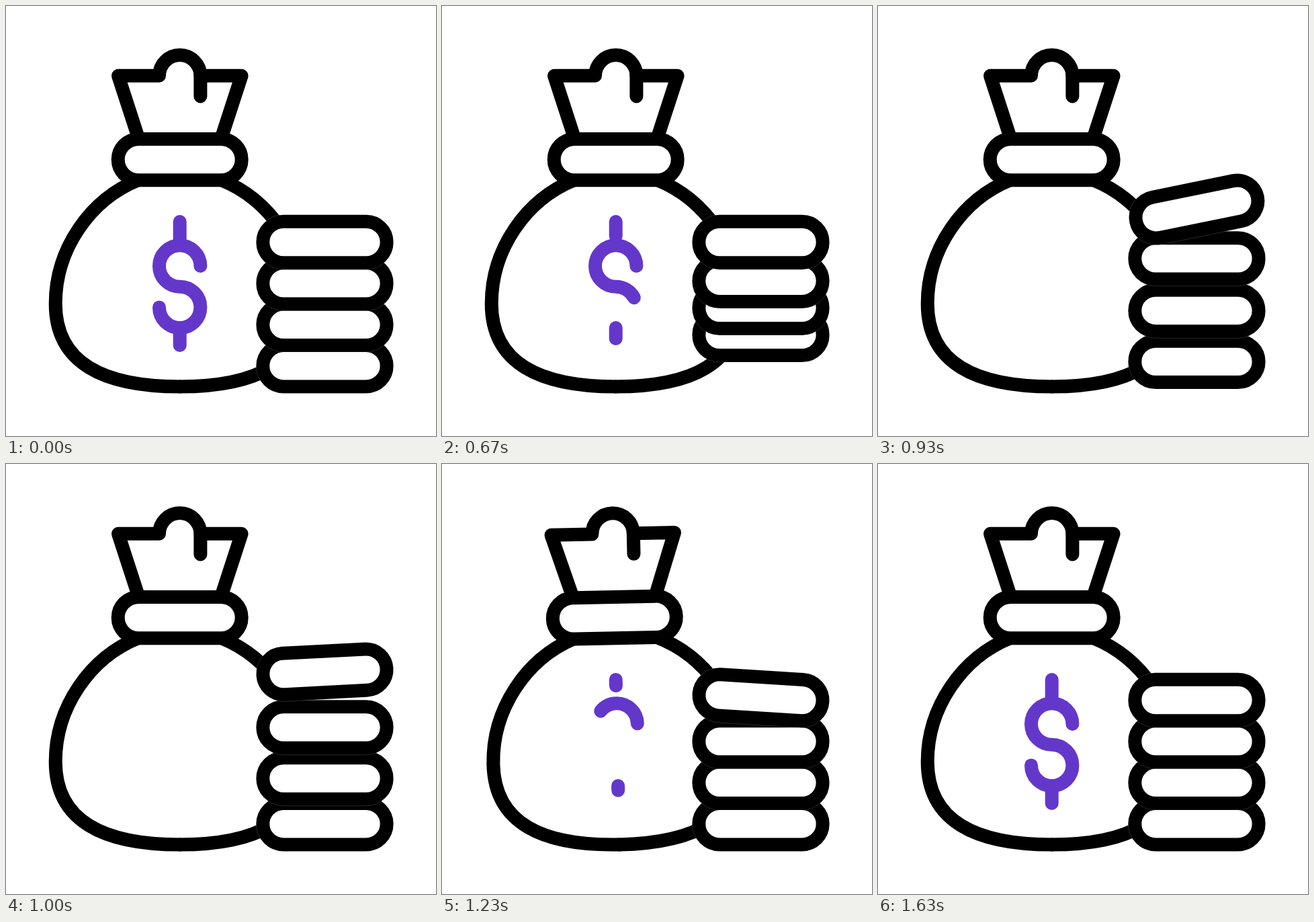
Animation of 640 by 640 pixels, one loop 2.5 s. Source, as an HTML page with a canvas:

```html
<!DOCTYPE html>
<html lang="en">
<head>
<meta charset="utf-8">
<title>Money bag and coins</title>
<style>
  html, body { margin: 0; width: 100%; height: 100%; overflow: hidden; background: #fff; }
  canvas { display: block; width: 100vw; height: 100vh; }
</style>
</head>
<body>
<canvas id="stage" width="640" height="640"></canvas>
<script>
const ctx = document.getElementById('stage').getContext('2d');
const LOOP = 2500, STEP = 100 / 3;
const R = 30.7, CX = 258.7, PIVOT_Y = 320;
const PURPLE = '#6437cb';
const COIN_X = 474.5, COIN_Y = 351.5, COIN_GAP = 61.4, LIFT = 50;

const clamp = v => Math.max(0, Math.min(1, v));
const smooth = u => u * u * (3 - 2 * u);

// Eased value through [time, value] keys
function track(keys, k) {
  if (k <= keys[0][0]) return keys[0][1];
  for (let i = 1; i < keys.length; i++) {
    const [t0, a] = keys[i - 1], [t1, b] = keys[i];
    if (k <= t1) return a + (b - a) * smooth((k - t0) / (t1 - t0));
  }
  return keys[keys.length - 1][1];
}

function rotateAt(x, y, deg) {
  ctx.translate(x, y);
  ctx.rotate(deg * Math.PI / 180);
  ctx.translate(-x, -y);
}

function path(draw, color = '#000') {
  ctx.beginPath();
  draw();
  ctx.strokeStyle = color;
  ctx.stroke();
}

function pill(x, y, half, r) {
  ctx.beginPath();
  ctx.arc(x - half, y, r, Math.PI / 2, Math.PI * 1.5);
  ctx.arc(x + half, y, r, -Math.PI / 2, Math.PI / 2);
  ctx.closePath();
}

function ring(x, y, half) {
  pill(x, y, half, R);
  ctx.fillStyle = '#fff';
  ctx.fill();
  ctx.strokeStyle = '#000';
  ctx.stroke();
}

function drawDollar(p) {
  if (p <= 0) return;
  const stub = (y0, y1) => path(() => {
    ctx.moveTo(CX, y0);
    ctx.lineTo(CX, y0 + (y1 - y0) * p);
  }, PURPLE);
  stub(321, 356);
  stub(479, 505);
  const sweep = p * Math.PI * 3, half = Math.PI * 1.5;
  path(() => {
    ctx.arc(CX, 387, R, 0, -Math.min(sweep, half), true);
    if (sweep > half) ctx.arc(CX, 387 + 2 * R, R, -Math.PI / 2, sweep - half - Math.PI / 2);
  }, PURPLE);
}

function drawBag(k) {
  ctx.save();
  rotateAt(CX, PIVOT_Y, track([[30, 0], [34, -3.3], [42, 3.3], [47, 0]], k));

  // Body, one half mirrored onto the other
  for (const s of [-1, 1]) {
    const x = d => CX + s * d;
    path(() => {
      ctx.moveTo(x(61.7), 259);
      ctx.bezierCurveTo(x(133.7), 288, x(185), 362, x(185), 443);
      ctx.bezierCurveTo(x(185), 532, x(113), 566.5, CX, 566.5);
    });
  }

  // Gathered top
  path(() => {
    ctx.moveTo(197.6, 198);
    ctx.lineTo(167, 103.8);
    ctx.lineTo(CX - R, 103.8);
    ctx.arc(CX, 103.8, R, Math.PI, 0);
    ctx.lineTo(CX + R, 134.4);
  });
  path(() => {
    ctx.moveTo(CX + R, 103.8);
    ctx.lineTo(350.6, 103.8);
    ctx.lineTo(320, 198);
  });
  ring(CX, 228.6, 61.3);

  const p = k < 30 ? 1 - clamp((k - 15) / 13) : clamp((k - 32.8) / 16.2);
  drawDollar(p);
  ctx.restore();
}

function drawCoins(k) {
  for (let i = 3; i >= 0; i--) {
    const start = 21 - 2 * i;
    const fall = i ? 9 : 12;
    const lift = track([[start, 0], [start + 6, LIFT], [start + 6 + fall, 0]], k);
    const tilt = i ? 0 : track([[21, 0], [27.5, -12], [33.5, 12], [39, 0]], k);
    const y = COIN_Y + i * COIN_GAP - lift;
    ctx.save();
    rotateAt(COIN_X, y, tilt);
    ring(COIN_X, y, 61.5);
    // Faint seam where a coin overlaps something dark
    pill(COIN_X, y, 61.5, R + 10.2);
    ctx.lineWidth = 0.6;
    ctx.strokeStyle = 'rgba(255,255,255,.25)';
    ctx.stroke();
    ctx.restore();
  }
}

const begin = performance.now();
function render() {
  const t = (performance.now() - begin) % LOOP;
  const k = Math.floor((t + 4) / STEP) % 75;
  ctx.fillStyle = '#fff';
  ctx.fillRect(0, 0, 640, 640);
  ctx.lineWidth = 20;
  ctx.lineCap = ctx.lineJoin = 'round';
  drawBag(k);
  drawCoins(k);
  requestAnimationFrame(render);
}
render();
</script>
</body>
</html>
```
